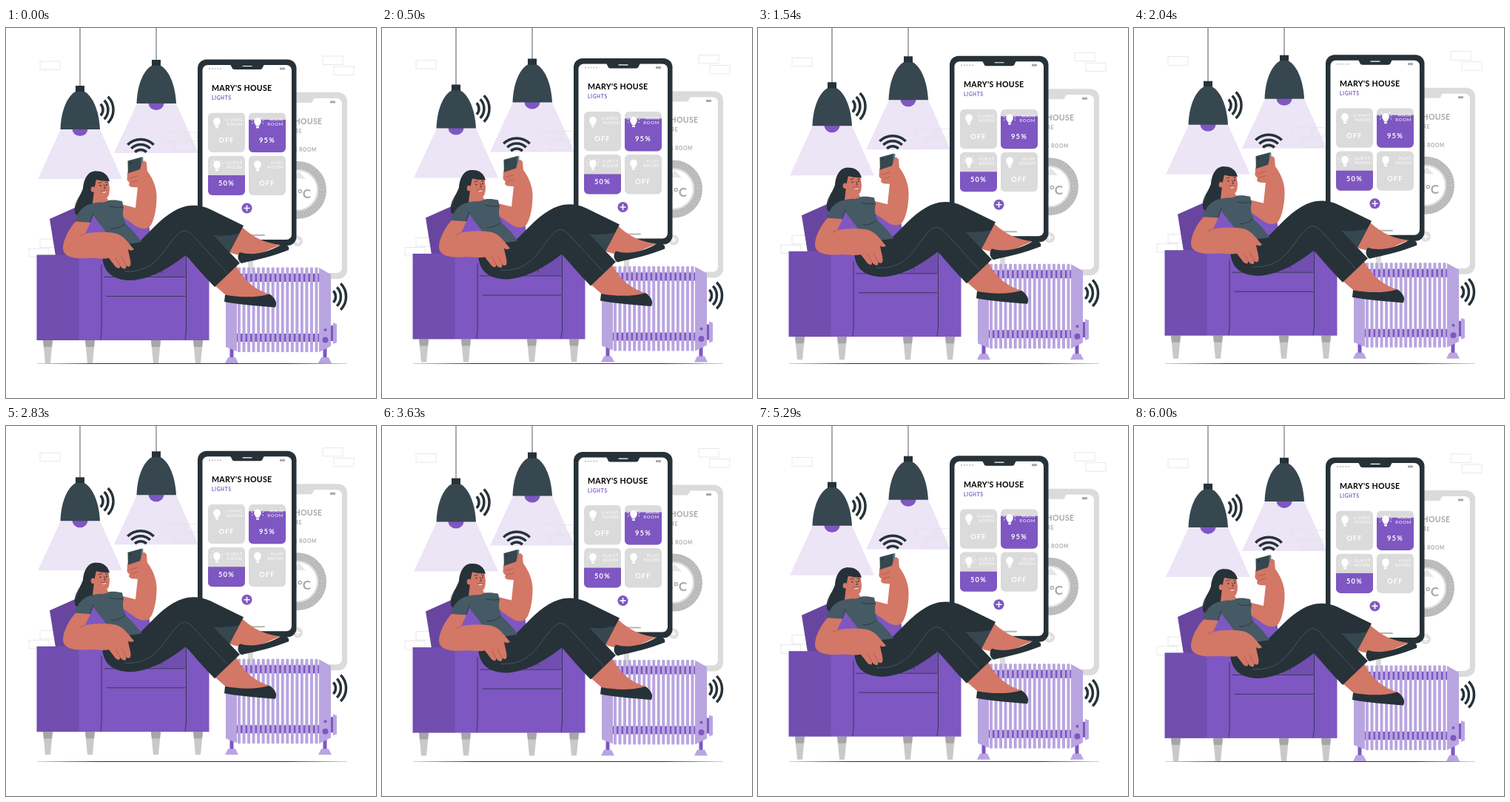
An HTML page for the animation above (6.04 s loop, 500 px wide and 500 px high).

```html
<!DOCTYPE html>
<html lang="en">
<head>
<meta charset="utf-8">
<title>Smart home</title>
<style>
html, body { margin: 0; width: 100%; height: 100%; overflow: hidden; background: #fff; }
svg { display: block; width: 100vw; height: 100vh; }
text { font-family: Lato, Inter, sans-serif; font-weight: 700; }
.ink { fill: #263238; }
.slate { fill: #37474f; }
.shirt { fill: #455a64; }
.skin { fill: #d37766; }
.violet { fill: #7e57c2; }
.deep { fill: #714eaf; }
.lilac { fill: #b9a5e0; }
.grey { fill: #dbdbdb; }
.line { fill: none; stroke: #263238; stroke-width: .8; stroke-linecap: round; }
.small { font-size: 6.1px; letter-spacing: .65px; fill: #fff; text-anchor: end; font-weight: 400; }
.value { font-size: 9.3px; letter-spacing: 1.2px; fill: #fff; text-anchor: middle; }
.title { font-size: 10.6px; letter-spacing: .3px; }
.sub { font-size: 6.5px; letter-spacing: .7px; }
</style>
</head>
<body>
<svg viewBox="0 0 500 500">
  <defs>
    <g id="wifi" fill="none" stroke="#263238" stroke-width="3.5">
      <path d="M-17.7-17.7A25 25 0 0 1 17.7-17.7M-12.7-12.7A18 18 0 0 1 12.7-12.7M-7.8-7.8A11 11 0 0 1 7.8-7.8"/>
    </g>
    <g id="lamp">
      <path fill="#ece5f6" d="M74 137L43 204H157L127 137Z"/>
      <ellipse class="violet" cx="100" cy="136.500" rx="10.500" ry="9.500"/>
      <path class="line" d="M100-20V80"/>
      <path class="slate" d="M94.500 85.500C84.500 91 74.500 108 73.500 137H127C125.500 108 115.500 91 105.500 85.500Z"/>
      <rect class="ink" x="94" y="78" width="12" height="8"/>
    </g>
    <g id="bulb" fill="#fff">
      <path d="M-2.3 5C-2.3 3-4.8 2-4.8-1.5A4.8 4.8 0 0 1 4.8-1.5C4.8 2 2.3 3 2.3 5Z"/>
      <rect x="-2" y="5.6" width="4" height="2.4" rx="1"/>
    </g>
    <path id="rays" fill="none" stroke="#fff" d="M-6.5 1L-8 2M-6.7-2L-8.3-2.7M-4.7-6L-5.8-7.4M4.7-6L5.8-7.4M6.7-2L8.3-2.7M6.5 1L8 2"/>
    <g id="add">
      <circle r="7"/>
      <path stroke="#fff" stroke-width="1.6" d="M-4 0H4M0-4V4"/>
    </g>
    <g id="leg">
      <path fill="#c9c9c9" d="M0 422H13L10 453H3Z"/>
      <path fill="#a6a6a6" d="M0 422H13L12 431H1Z"/>
    </g>
    <g id="foot">
      <rect class="violet" x="-2.5" y="430" width="5" height="16"/>
      <path class="lilac" d="M-9 453L-5 445H5L9 453Z"/>
    </g>
    <clipPath id="card"><rect width="50" height="53.5" rx="6"/></clipPath>
    <linearGradient id="fade">
      <stop offset="0" stop-color="#263238" stop-opacity=".2"/>
      <stop offset=".2" stop-color="#263238"/>
      <stop offset=".8" stop-color="#263238"/>
      <stop offset="1" stop-color="#263238" stop-opacity=".2"/>
    </linearGradient>
  </defs>

  <rect x="42" y="453" width="419" height="1" fill="url(#fade)"/>

  <g id="scene">
    <use href="#lamp"/>
    <use href="#lamp" x="103" y="-35"/>
    <g id="bricks" fill="none" stroke="#e3e0e6" stroke-width=".8"></g>
    <use href="#wifi" transform="translate(120 110.5) rotate(90)"/>
    <use href="#wifi" transform="translate(182 175.5)"/>
    <use href="#wifi" transform="translate(434.5 363) rotate(90)"/>

    <!-- rear phone -->
    <g transform="translate(68 45)" fill="#a8a8a8">
      <rect class="grey" x="259" y="42" width="134" height="252" rx="12"/>
      <rect fill="#fff" x="266" y="50" width="120" height="236" rx="7"/>
      <path class="grey" d="M303 49H349L346 55Q345 56 343 56H309Q307 56 306 55Z"/>
      <rect x="370" y="53.5" width="7" height="3"/>
      <text class="title" x="278" y="85">MARY'S HOUSE</text>
      <text class="sub" x="278" y="97">TEMPERATURE</text>
      <text class="sub" x="326" y="122" text-anchor="middle">LIVING ROOM</text>
      <circle cx="326" cy="174" r="33.5" fill="none" stroke="#b9b9b9" stroke-width="11"/>
      <circle cx="326" cy="174" r="33.5" fill="none" stroke="#c6c6c6" stroke-width="9" stroke-dasharray="1 3"/>
      <circle cx="326" cy="174" r="27" fill="none" stroke="#dedede" stroke-width="2"/>
      <path fill="#e6e6e6" d="M318 158L328 149L337 159Z"/>
      <text x="344" y="185" font-size="17" text-anchor="end">25°C</text>
      <use href="#add" x="326" y="243" fill="#dedede"/>
    </g>

    <!-- front phone -->
    <rect class="ink" x="259" y="42.500" width="133.500" height="251.500" rx="12"/>
    <rect fill="#fff" x="265.500" y="50" width="120.500" height="236" rx="7"/>
    <path class="ink" d="M303 49H349L346 55Q345 56 343 56H309Q307 56 306 55Z"/>
    <path stroke="#fff" stroke-width="1.2" stroke-linecap="round" d="M320 51.5H332"/>
    <path stroke="#bbb" stroke-width="1.6" stroke-dasharray="2 1.8" d="M274 55H292"/>
    <rect x="370" y="53.5" width="7" height="3" fill="#aaa"/>
    <text class="title" x="278" y="85" fill="#000">MARY'S HOUSE</text>
    <text class="sub violet" x="278" y="97">LIGHTS</text>
    <g id="cards"></g>
    <use href="#add" class="violet" x="325.5" y="243.5"/>
    <rect x="310" y="279" width="40" height="2" rx="1" fill="#b5b5b5"/>

    <!-- heater -->
    <use href="#foot" x="305"/>
    <use href="#foot" x="431"/>
    <path class="violet" d="M312 332H424V343H312ZM312 413H424V424H312ZM439 402H443V423H439Z"/>
    <g id="fins" class="lilac"></g>
    <path class="lilac" d="M297 330L312 323V437L297 431ZM423 324L439 333V430L423 438ZM442 398L447 400V425L442 427Z"/>
    <circle class="violet" cx="431.5" cy="408" r="2"/>
    <circle class="violet" cx="431.5" cy="421.5" r="4"/>

    <!-- armchair -->
    <use href="#leg" x="50"/>
    <use href="#leg" x="107"/>
    <use href="#leg" x="196"/>
    <use href="#leg" x="253"/>
    <path fill="#68469f" d="M67 308L59 258L95 242L120 258L112 308Z"/>
    <path class="violet" d="M98 310L107 255L120 245L192 259L200 310Z"/>
    <rect class="violet" x="98" y="306.500" width="176.500" height="115.500"/>
    <rect class="deep" x="41.500" y="306.500" width="57" height="115.500"/>
    <path class="deep" d="M200 306.500H243V336H200Z"/>
    <path class="line" d="M129 320V410L128 421M243.500 307V410L242 421M132 336.500H242M136 362.500H242M202 300L211 331"/>

    <!-- woman -->
    <path class="ink" d="M122 193.500C109 194 105 206 104 217C100 228 92 238 93 250C98 258 112 254 120 246C129 239 130 224 126 214Z"/>
    <path class="line" d="M104 222C96 231 91 241 94 249"/>
    <path class="skin" d="M155 238L175 243L178 215L167 208C163 202 163 196 166 191L187 179L190 192C197 201 203 213 203.500 226C204 240 201 258 196 266C191 274 181 272 173 266L156 254Z"/>
    <path class="slate" d="M164.500 179.500L183 174.500Q185 174 185 176L183 196L165 201Z"/>
    <path fill="#607d8b" d="M183 174.500L185.500 175L184 194L182 194Z"/>
    <circle class="ink" cx="168.500" cy="182.500" r="1.300"/>
    <path class="skin" d="M164 200Q163 196 169 195L181 191L184 182Q187 178 190 182L191 196L186 216L170 215Q164 213 167 209Q162 206 164 200Z"/>
    <path fill="none" stroke="#a95448" stroke-width=".7" d="M167 203L178 200M168 209L178 206"/>

    <path class="skin" d="M319 269C335 284 352 291 371 293L348 303C335 309 318 309 301 303Z"/>
    <path class="ink" d="M371 293.500C378 291 384 295 382 300C362 308 340 313 318 318C313 314 312 308 316 303C335 309 355 302 371 293.500Z"/>
    <path class="skin" d="M281 347L311 321C322 343 338 354 357 360C346 368 318 367 297 361Z"/>
    <path class="ink" d="M296 360.500C314 364 338 365 356 359.500C364 365 367 371 364 377.500C345 376 318 374 295 370Z"/>
    <path class="ink" d="M130 309C132 335 150 341 170 341C198 339 222 323 243 307C254 319 267 335 282 350L316 317.500L302 303L321 267L276 245C256 236 240 240 226 248C208 258 193 277 181 288L150 285Z"/>
    <path class="slate" d="M280 280Q296 282 315 278L302 303Z"/>
    <path fill="none" stroke="#52656e" stroke-width=".7" d="M160 329C203 331 212 300 229 282C239 271 244 272 253 281L299 331"/>

    <path class="skin" d="M119 220L134 226L139 234Q128 241 117 237Z"/>
    <path class="shirt" d="M116 237.500C126 234 130 238 139 233C146 232 151 233 157 234L159 243C156 252 160 262 163 266C171 273 178 281 183 289C168 292 150 294 140 283C133 272 124 262 118 253L114 263L93 261C98 246 106 239 116 237.500Z"/>
    <path class="line" d="M118 250L114 262M140 241Q150 244 158 242M142 271Q151 272 160 265"/>
    <path class="skin" d="M94 261.500L114 263L107 278C121 275 139 275 150 278C161 282 166 292 173 299Q169 302 165 299C166 307 170 317 168 321C166 324 163 322 162 320C164 327 158 327 154 321C155 327 149 325 146 320L139 311C130 313 118 310 110 311C96 312 77 311 77 297C77 286 86 270 94 261.500Z"/>
    <path fill="none" stroke="#a95448" stroke-width=".7" d="M162 320L156 309M154 321L148 310M107 278L100 281"/>

    <path class="skin" d="M117 203L136 201C139 205 139 211 140 216C140 226 138 231 132 230.500C122 229 114 221 117 203Z"/>
    <path class="ink" d="M108 221C104 203 111 193 122 193.500C132 193 138 199 140 207C132 207 127 206 122 205C120 212 120 218 116 223Z"/>
    <ellipse class="skin" cx="117.500" cy="218" rx="2.800" ry="3.800"/>
    <g class="ink">
      <circle cx="127.500" cy="213" r="1"/>
      <circle cx="136" cy="212" r="1"/>
    </g>
    <path class="line" d="M125 209.500L129 208.500M134.500 208.500L137.500 209M132.500 212L134.500 216.500L132.500 217"/>
    <path fill="#fff" d="M129 220.500Q133 222 136 220Q135 223 131.500 222.500Z"/>
    <path fill="none" stroke="#7a332d" stroke-width=".8" d="M128.500 220Q132 222 136.500 219.500"/>
  </g>
</svg>
<script>
const $ = id => document.getElementById(id);

const bricks = [[46, 45], [428, 38], [443, 52], [212, 141], [242, 141], [227, 155], [46, 285], [31, 298]];
$('bricks').innerHTML = bricks.map(([x, y]) =>
  `<rect x="${x}" y="${y}" width="${x === 242 ? 16 : 27}" height="11.5"/>`).join('');

// Each card: position, room, value, height of the unfilled part, lit bulb
const card = (x, y, room, value, top, lit) => `<g transform="translate(${x} ${y})">
  <g clip-path="url(#card)">
    <rect class="grey" width="50" height="54"/>
    <rect class="violet" y="${top}" width="50" height="54"/>
  </g>
  <use href="#bulb" x="12" y="13"/>
  ${lit ? '<use href="#rays" x="12" y="13"/>' : ''}
  <text class="small" x="47" y="11.5">${room}</text>
  <text class="small" x="47" y="17.5">ROOM</text>
  <text class="value" x="25" y="40.5">${value}</text></g>`;
$('cards').innerHTML =
  card(273, 114.5, 'LIVING', 'OFF', 54, false) +
  card(328, 114.5, 'MAIN', '95%', 9.5, true) +
  card(273, 172.5, 'GUEST', '50%', 26.5, true) +
  card(328, 172.5, 'PLAY', 'OFF', 54, false);

const FINS = 17, PITCH = 111 / FINS;
$('fins').innerHTML = Array.from({ length: FINS }, (_, i) =>
  `<rect x="${313 + i * PITCH}" y="323.5" width="4" height="114.5" rx="1"/>`).join('');

const LOOP = 6040, LIFT = 9.3;
function draw(now) {
  const phase = now % LOOP / (LOOP / 2);
  const rise = LIFT * (1 - Math.abs(1 - phase));
  $('scene').setAttribute('transform', `translate(0 ${-rise})`);
  requestAnimationFrame(draw);
}
draw(performance.now());
</script>
</body>
</html>
```
